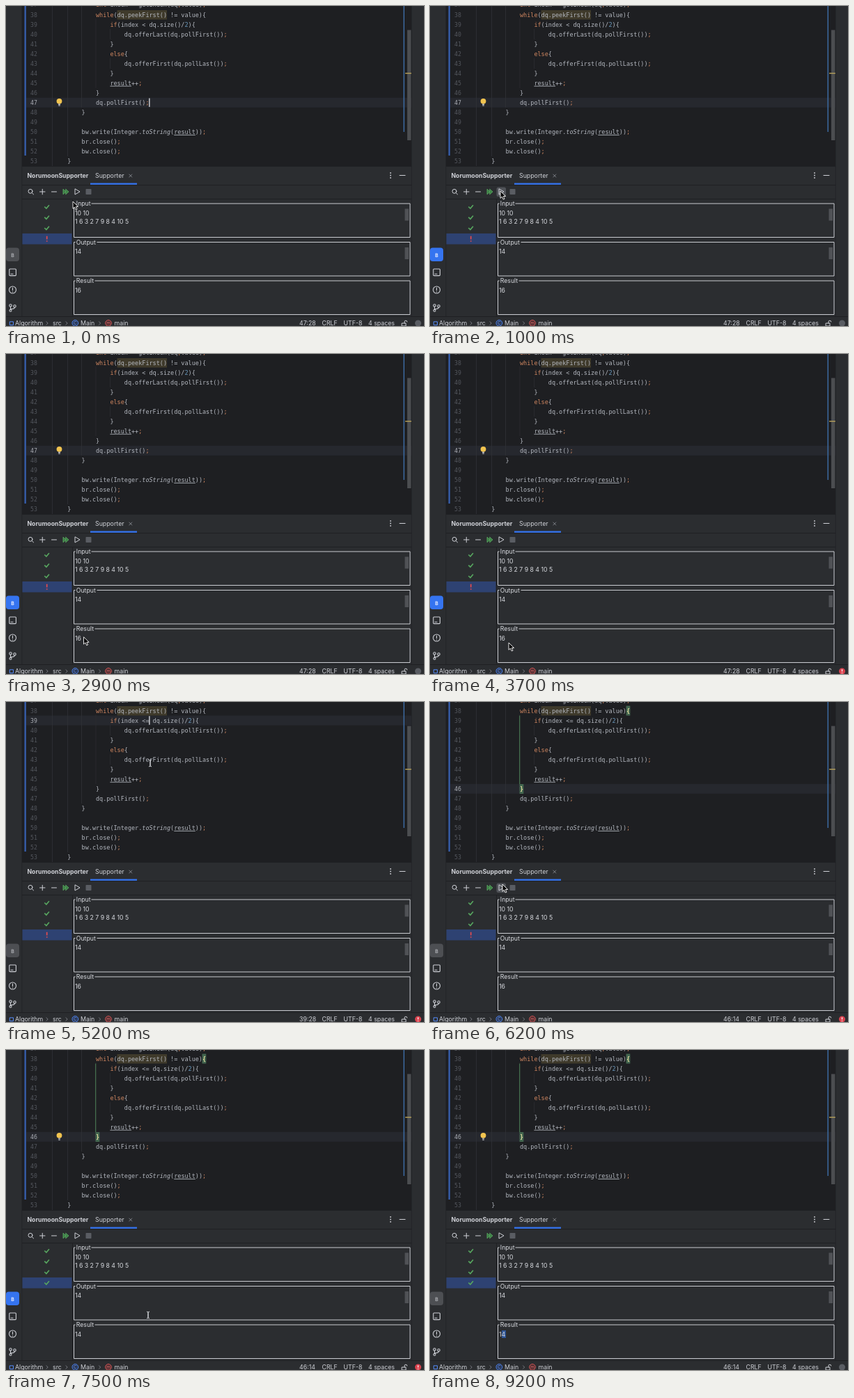
Write an HTML page that moves like this. It is 600 px wide and 460 px high and loops after 9300 ms.

```html
<!DOCTYPE html>
<html lang="en">
<head>
<meta charset="utf-8">
<style>
html, body { margin: 0; width: 100%; height: 100%; overflow: hidden; background: #2b2d30; }
svg { display: block; width: 600px; height: 460px; }
text { white-space: pre; }
.code { font: 8.47px "DejaVu Sans Mono", monospace; fill: #b3b7bf; }
.num { font: 8.2px "DejaVu Sans Mono", monospace; fill: #53565d; }
.ui { font: 8.8px Inter, sans-serif; fill: #ced0d6; }
.io { font: 8.7px Inter, sans-serif; fill: #d9dbe0; }
.kw { fill: #cf8660; }
.nm { fill: #6897bb; }
.it { font-style: italic; }
.un { text-decoration: underline; text-decoration-thickness: .6px; }
.line { fill: none; stroke: #ced0d6; stroke-linecap: round; stroke-linejoin: round; }
</style>
</head>
<body>
<svg id="stage" viewBox="0 0 600 460">
  <rect width="600" height="460" fill="#2b2d30"/>
  <rect x="23" width="559" height="230" fill="#1e1f22"/>
  <svg width="600" height="230" viewBox="0 0 600 230">
    <rect id="row" x="29" width="553" height="14" fill="#26282e"/>
    <path d="M66.5 0V230M88.5 0V216M108.5 0V146" stroke="#303237" stroke-width=".8"/>
    <path d="M129 18V118M149.5 33V48M149.5 75V90" stroke="#2b2d31" stroke-width=".8"/>
    <rect x="159.500" y="6" width="71.500" height="13.500" fill="#3f3a2b"/>
    <g id="pair">
      <path d="M128.700 19.500V118" stroke="#4d8057" stroke-width="1"/>
      <rect x="281.500" y="5.500" width="5.800" height="14" fill="#43664f"/>
      <rect x="128.500" y="118" width="5.800" height="14" fill="#43664f"/>
    </g>
    <g id="code"></g>
    <g id="pairText" class="code" style="fill:#ffef9a"><text x="282" y="15.500">{</text><text x="129" y="128">}</text></g>
    <rect x="26.500" width="2.300" height="215" fill="#375fad"/>
    <rect x="570.500" width="1.500" height="181" fill="#3b689e"/>
    <rect x="576" y="34.500" width="5.500" height="158.500" fill="#4b4d50"/>
    <rect x="573" y="96" width="9" height="1.400" fill="#b6a05a"/>
    <rect id="caret" width="1.300" height="12.500" fill="#dfe1e5"/>
    <g id="bulb">
      <circle cx="76.500" cy="-2" r="3.900" fill="#f2c44f"/>
      <path d="M75 2.500h3M75.300 4.300h2.400" stroke="#c9ccd2" stroke-width="1.100"/>
    </g>
  </svg>

  <!-- tool window -->
  <path d="M23 230.500H582M23 257.500H582M23 277.500H582M95.500 278V446M0 446.500H600" stroke="#1f2023" fill="none"/>
  <path d="M22.800 0V446M582.300 0V446" stroke="#232427" stroke-width=".8"/>
  <text class="ui" x="30.500" y="247" style="font-weight:700;font-size:8.700px">NorumoonSupporter</text>
  <text class="ui" x="128" y="247">Supporter</text>
  <rect x="121" y="254.500" width="67" height="2.300" fill="#3574f0"/>
  <path d="M176.800 242l4 4m0-4l-4 4" class="line" style="stroke:#85888f" stroke-width=".9"/>
  <g fill="#ced0d6"><circle cx="552" cy="240" r=".9"/><circle cx="552" cy="243.500" r=".9"/><circle cx="552" cy="247" r=".9"/></g>
  <path class="line" d="M565 243.500h8"/>
  <rect id="hover" x="95.500" y="260.500" width="13.500" height="13.500" rx="2.500" fill="#505358"/>
  <circle class="line" cx="35" cy="266.300" r="3"/>
  <path class="line" d="M37.400 268.700l2.200 2.200M48.500 267h7.500M52.250 263.300v7.500M65.500 267h7"/>
  <path d="M82 263.200v7.600l4-3.800zM85.700 263.200v7.600l4.300-3.800z" fill="#3c7f45" stroke="#57a55f" stroke-width=".9" stroke-linejoin="round"/>
  <path class="line" d="M99 263.200v7.800l6.700-3.900z"/>
  <rect x="114.500" y="263" width="8" height="8" rx=".8" fill="#5a5d63"/>
  <rect x="23.500" y="327" width="71" height="15.500" fill="#2e4272"/>
  <g id="checks" fill="none" stroke="#57a55f" stroke-width="1.700"></g>
  <path id="fail" d="M58.700 330.800v4.600M58.700 337.300v1.500" stroke="#db4b50" stroke-width="1.800"/>
  <g id="fields"></g>
  <rect id="mark" x="103" y="403" width="6" height="11" fill="#2f5596"/>
  <g class="io">
    <text x="99" y="300.500">10 10</text>
    <text x="99" y="312.800">1 6 3 2 7 9 8 4 10 5</text>
    <text x="99" y="356.300">14</text>
    <text x="99" y="411.800" id="result"></text>
  </g>

  <!-- left strip -->
  <rect id="badge" x="0" y="347.500" width="19" height="19.500" rx="4"/>
  <text id="badgeText" x="9.500" y="360.500" text-anchor="middle" style="font:700 7.500px 'DejaVu Sans Mono',monospace">B</text>
  <g class="line" stroke-width="1.100">
    <rect x="4.800" y="378" width="9.600" height="9.600" rx="1"/>
    <path d="M7 385.300h3M9.500 405v3.600M9.500 410.800v.2"/>
    <circle cx="9.500" cy="408" r="5"/>
    <circle cx="6.500" cy="430.500" r="1.700"/><circle cx="12.500" cy="431.500" r="1.700"/><circle cx="6.500" cy="437.800" r="1.500"/>
    <path d="M6.500 432.200v4.100M12.500 433.200q0 2.300-6 2.400"/>
  </g>

  <!-- status bar -->
  <rect x="5.700" y="453.800" width="4.800" height="4.800" class="line" style="stroke:#548af7" stroke-width="1"/>
  <g class="ui" id="status">
    <text x="13" y="459">Algorithm</text><text x="67" y="459">src</text>
    <text x="107" y="459">Main</text><text x="155.500" y="459">main</text>
    <text x="421" y="459" id="pos"></text><text x="453.500" y="459">CRLF</text>
    <text x="484.500" y="459">UTF-8</text><text x="520" y="459">4 spaces</text>
  </g>
  <path class="line" style="stroke:#80838a" stroke-width=".9" d="M58 453.800l2.200 2.200-2.200 2.200M86 453.800l2.200 2.200-2.200 2.200M133.500 453.800l2.200 2.200-2.200 2.200"/>
  <circle cx="99.300" cy="455.800" r="4.300" fill="#25324d" stroke="#548af7"/>
  <circle cx="147" cy="455.800" r="4.300" fill="#45272a" stroke="#db5c5c"/>
  <g text-anchor="middle" style="font:6.500px Inter,sans-serif"><text x="99.300" y="458.200" fill="#78a2ff">C</text><text x="147" y="457.600" fill="#ee7777">m</text></g>
  <path class="line" d="M568.500 456h5.500v4h-5.500zM572 456v-2q0-1.800 1.900-1.800t1.900 1.800"/>
  <circle id="dot" cx="591.500" cy="456" r="4.500"/>
  <path id="dotMark" d="M591.500 453.200v3.200M591.500 457.900v1.200" stroke="#fff" stroke-width="1.200"/>

  <path id="arrow" d="M0 0V10.300L2.400 8.100 4.200 12 6 11.200 4.300 7.500H7.600Z" fill="#000" stroke="#fff" stroke-width=".9" stroke-linejoin="round"/>
  <g id="beam" fill="none">
    <path d="M-2-4.800q2 0 2 1.200V3.600q0 1.200-2 1.200M2-4.800q-2 0-2 1.200V3.600q0 1.200 2 1.200" stroke="#d5d7db" stroke-width="1"/>
  </g>
</svg>
<script>
const LOOP = 9300, CH = 5.1, COL0 = 67.8, ROW = 14.04;
const $ = id => document.getElementById(id);
const rowY = n => 12.5 + (n - 38) * ROW;
const colX = c => COL0 + c * CH;

// tokens: ~k keyword, ~n number, ~i italic, ~u underline, closed by ~.
const lines = [
  [12, '~kint~. index = getIndex(dq~k,~.value)~k;~.'],
  [12, '~kwhile~.(dq.peekFirst() != value){'],
  [16, ''],
  [20, 'dq.offerLast(dq.pollFirst())~k;~.'],
  [16, '}'],
  [16, '~kelse~.{'],
  [20, 'dq.offerFirst(dq.pollLast())~k;~.'],
  [16, '}'],
  [16, '~uresult~.++~k;~.'],
  [12, '}'],
  [12, 'dq.pollFirst()~k;~.'],
  [8, '}'],
  [0, ''],
  [8, 'bw.write(Integer.~itoString~.(~uresult~.))~k;~.'],
  [8, 'br.close()~k;~.'],
  [8, 'bw.close()~k;~.'],
  [4, '}']
];
const cls = { k: 'kw', n: 'nm', i: 'it', u: 'un' };
const paint = s => s.replace(/</g, '&lt;')
  .replace(/~([knui])(.*?)~\./g, (m, k, body) => `<tspan class="${cls[k]}">${body}</tspan>`);

$('code').innerHTML = lines.map(([col, s], i) => {
  const n = 37 + i, y = rowY(n) + 3;
  return `<text class="num" id="n${n}" x="35" y="${y}">${n}</text>` +
    `<text class="code" id="c${n}" x="${colX(col)}" y="${y}">${paint(s)}</text>`;
}).join('');

$('checks').innerHTML = [288.5, 303.7, 319, 334.5].map((y, i) =>
  `<path id="ok${i}" d="M55.300 ${y}l2.600 2.500 4-4.700"/>`).join('');

$('fields').innerHTML = [['Input', 284, 121], ['Output', 339.5, 129], ['Result', 395, 126]].map(([name, y, x], i) =>
  `<path d="M99.500 ${y}H97.500V${y + 48.5}H580V${y}H${x + 1.5}" fill="none" stroke="#c9cbd0"/>` +
  `<text class="io" x="100.800" y="${y + 3}">${name}</text>` +
  (i < 2 ? `<rect x="572.500" y="${y + 7.5}" width="5.500" height="17" fill="#505256"/>` : '')).join('');

// pointer stops: time, x, y
const path = [
  [0, 96, 281], [500, 101, 266], [2200, 101, 266], [3000, 112, 413], [3700, 113, 415], [3900, 113, 415],
  [4400, 201, 28], [4850, 201, 28], [5200, 207, 88], [5550, 218, 125], [5750, 218, 125],
  [6150, 104, 262], [6900, 104, 263], [7400, 204, 381], [7900, 204, 381], [8350, 109, 408], [8550, 109, 408], [8800, 103, 408]
];
const ease = u => u * u * (3 - 2 * u);
function pointer(t) {
  const i = path.findIndex(p => p[0] > t);
  if (i < 0) return path[path.length - 1].slice(1);
  const [t0, x0, y0] = path[i - 1], [t1, x1, y1] = path[i];
  const u = ease((t - t0) / (t1 - t0));
  return [x0 + (x1 - x0) * u, y0 + (y1 - y0) * u];
}

const show = (id, on) => $(id).setAttribute('visibility', on ? 'visible' : 'hidden');
const set = (id, k, v) => $(id).setAttribute(k, v);
const put = (id, s) => { if ($(id).textContent !== s) $(id).textContent = s; };
const between = (t, a, b) => t >= a && t < b;
let lastIf = '';

function draw(t) {
  const typed = t >= 4800, passed = t >= 6600;
  const [line, col] = t < 4500 ? [47, 27] : t < 5650 ? [39, typed ? 27 : 26] : [46, 13];
  const focus = between(t, 700, 4500) || between(t, 7200, 9100);

  const cond = `~kif~.(index ${typed ? '<=' : '<'} dq.size()/~n2~.){`;
  if (cond !== lastIf) $('c39').innerHTML = paint(lastIf = cond);

  set('row', 'y', rowY(line) - 7);
  for (const n of [39, 46, 47]) $('n' + n).style.fill = n === line ? '#a9acb3' : '';
  show('pair', line === 46);
  show('pairText', line === 46);
  set('caret', 'x', colX(col) - .3);
  set('caret', 'y', rowY(line) - 6.3);
  const since = t < 4500 ? t : t < 4800 ? t - 4500 : t < 5650 ? t - 4800 : t - 5650;
  show('caret', !focus && t < 9100 && since % 1000 < 500);
  set('bulb', 'transform', `translate(0 ${rowY(line)})`);
  show('bulb', t < 4500 || t >= 6900);
  put('pos', line + ':' + (col + 1));

  set('badge', 'fill', focus ? '#3574f0' : '#4d4f53');
  set('badgeText', 'fill', focus ? '#e3eaff' : '#a9abb0');
  show('ok3', passed);
  show('fail', !passed);
  put('result', passed ? '14' : '16');
  show('mark', t >= 8650);

  const phase = t % 1010 / 1010, alert = phase > .12 && phase < .67;
  set('dot', 'fill', alert ? '#db4450' : '#5a5d63');
  show('dotMark', alert);

  const [x, y] = pointer(t);
  const beam = y < 230 || (x > 98 && y > 340 && t > 7000);
  set('arrow', 'transform', `translate(${x} ${y})`);
  set('beam', 'transform', `translate(${x} ${y})`);
  show('arrow', !beam && t < 8900);
  show('beam', beam && t < 8900);
  show('hover', between(x, 95, 109) && between(y, 260, 274));
}

const start = performance.now();
function tick() {
  draw((performance.now() - start) % LOOP);
  requestAnimationFrame(tick);
}
tick();
</script>
</body>
</html>
```
